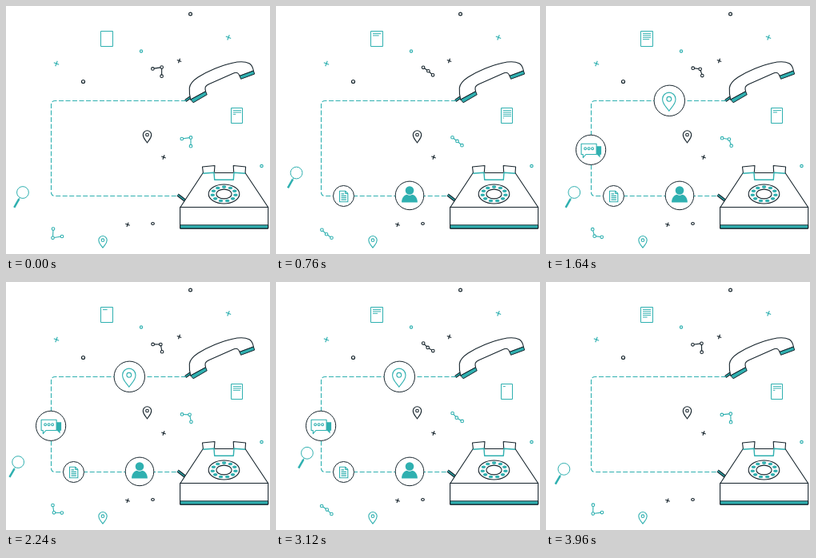
Animation of 330 by 310 pixels, one loop 4000 ms. Source, as an HTML page with a canvas:

```html
<!DOCTYPE html>
<html lang="en">
<head>
<meta charset="utf-8">
<title>Phone call flow</title>
<style>
  html, body { margin: 0; width: 100%; height: 100%; overflow: hidden; background: #fff; }
  canvas { display: block; width: 330px; height: 310px; }
</style>
</head>
<body>
<canvas id="stage"></canvas>
<script>
const W = 330, H = 310, LOOP = 4000, HALF = 2000;
const TEAL = '#2fb0b0', DARK = '#16242c', WHITE = '#fff';
const canvas = document.getElementById('stage');
const ctx = canvas.getContext('2d');
const ratio = window.devicePixelRatio || 1;
canvas.width = W * ratio;
canvas.height = H * ratio;

const clamp = v => Math.max(0, Math.min(1, v));
const mix = (a, b, k) => a + (b - a) * k;
const easeOut = k => 1 - (1 - k) ** 3;

function paint(path, stroke, fill, width = 1) {
  if (fill) { ctx.fillStyle = fill; ctx.fill(path); }
  if (stroke) { ctx.strokeStyle = stroke; ctx.lineWidth = width; ctx.stroke(path); }
}

function shape(d, stroke, fill, width) {
  paint(new Path2D(d), stroke, fill, width);
}

function oval(x, y, rx, ry, stroke, fill, width) {
  const p = new Path2D();
  p.ellipse(x, y, rx, ry, 0, 0, Math.PI * 2);
  paint(p, stroke, fill, width);
}

const ring = (x, y, r, stroke, fill, width) => oval(x, y, r, r, stroke, fill, width);

function cross(x, y, r, color) {
  const s = r * .38;
  shape(`M${x - r} ${y - s}L${x + r} ${y + s}M${x + s} ${y - r}L${x - s} ${y + r}`, color, null, 1.15);
}

// Map pin: (x, y) is the head centre, r its radius, drop the distance to the tip.
function pin(x, y, r, drop, hole, color, width) {
  shape(`M${x} ${y + drop}C${x - r * .35} ${y + drop * .68} ${x - r} ${y + r * .85} ${x - r} ${y}` +
    `A${r} ${r} 0 0 1 ${x + r} ${y}` +
    `C${x + r} ${y + r * .85} ${x + r * .35} ${y + drop * .68} ${x} ${y + drop}Z`, color, WHITE, width);
  ring(x, y, hole, color, null, width);
}

function scatter() {
  ring(230.5, 10, 1.9, DARK, null, 1.2);
  ring(96.5, 94.5, 2, DARK, null, 1.2);
  oval(183.5, 272, 1.8, 1.5, DARK, null, 1.2);
  ring(169, 56.5, 1.6, TEAL, null, 1.2);
  ring(319.5, 200, 1.7, TEAL, null, 1.2);
  cross(63, 72, 3.2, TEAL);
  cross(278, 39.3, 3.2, TEAL);
  cross(216.5, 68.5, 2.7, DARK);
  cross(197, 189, 2.7, DARK);
  cross(152, 273.3, 2.7, DARK);
  pin(176.5, 161, 5.2, 10, 1.8, DARK, 1.1);
  pin(121, 292.7, 5.2, 9.5, 1.8, TEAL, 1.1);
}

function wire() {
  ctx.setLineDash([6, 2.5]);
  shape('M225 118.5H61.5Q56.5 118.5 56.5 123.5V232.5Q56.5 237.5 61.5 237.5H216', TEAL, null, 1.1);
  ctx.setLineDash([]);
}

function plug(x1, y1, x2, y2) {
  const d = `M${x1} ${y1}L${x2} ${y2}`;
  shape(d, DARK, null, 3.6);
  shape(d, TEAL, null, 1.4);
}

function handset() {
  plug(224.2, 118.4, 231, 113.8);
  shape('M230.8 117C229.5 112 229 107 229.3 102.5C229.8 97 234 93 240 89C252 81.5 270 74 283 71.2' +
    'C290 69.6 299 69.2 304 71.8C308 73.8 308.5 77 309.4 81L292 87.4C291 84.5 289 82 284.5 84' +
    'L254 97.5C248 100 248.6 103 249.6 106.8Z', DARK, WHITE, 1.1);
  shape('M230.8 117L249.6 106.8L251.2 110.8L234.1 120.8Z', DARK, TEAL);
  shape('M292 87.4L309.4 81L310.7 85L293.6 91.3Z', DARK, TEAL);
}

function base() {
  plug(214.6, 236, 224, 243.2);
  shape('M218 251.5L246.3 208.5H299L327.6 251.5Z', DARK, WHITE, 1.1);
  shape('M246.5 209L245.5 201L261 199.5L260.3 209Z', null, WHITE);
  shape('M284.7 209L284.2 199.5L299.6 201L299 209Z', null, WHITE);
  shape('M246.5 209L245.5 201L261 199.5L260.3 208M284.7 208L284.2 199.5L299.6 201L299 209', DARK, null, 1.1);
  shape('M246.3 209.2L260 208.3L260.7 217.3H284.3L285 208.3L299 209.2', TEAL, WHITE, 1.4);
  shape('M217.6 251.5H327.7V277.2Q327.7 278.2 326.7 278.2H218.6Q217.6 278.2 217.6 277.2Z', null, WHITE);
  shape('M217.6 273.8H327.7V278H217.6Z', DARK, TEAL, .9);
  shape('M217.6 251.5H327.7V277.2Q327.7 278.2 326.7 278.2H218.6Q217.6 278.2 217.6 277.2Z', DARK, null, 1.1);

  oval(272.5, 235, 19.3, 12, DARK, WHITE, 1.1);
  for (let i = 0; i < 11; i++) {
    const a = -Math.PI / 2 + i * Math.PI * 2 / 11;
    oval(272.6 + Math.cos(a) * 14.5, 235 + Math.sin(a) * 8.9, 2.8, 1.8, null, TEAL);
  }
  oval(272.5, 235, 9.6, 5.9, DARK, WHITE, 1.1);
}

// A pen writes line after line at constant speed and runs out in the fifth.
function page(x, y, w, h, t) {
  shape(`M${x} ${y}h${w}v${h}h${-w}Z`, TEAL, WHITE);
  for (let i = 0; i < 5; i++) {
    const k = clamp(t / 430 - i);
    if (k > 0) shape(`M${x + 2.5} ${y + 3.1 + i * 2.35}h${10 * k}`, TEAL, null, .95);
  }
}

// Three linked nodes swing between two poses.
function nodes(from, to, k, color) {
  const pts = from.map((p, i) => [mix(p[0], to[i][0], k), mix(p[1], to[i][1], k)]);
  shape('M' + pts.map(p => p.join(' ')).join('L'), color, null, 1.1);
  pts.forEach(p => ring(p[0], p[1], 1.8, color, WHITE, 1.1));
}

function trios(t) {
  const k = 1 - Math.abs(1 - t % HALF / 1000);
  nodes([[183.4, 78.4], [194.7, 76.6], [194.6, 87.7]], [[184.3, 76.3], [189, 82.7], [196.5, 85.9]], k, DARK);
  nodes([[219.8, 166], [231, 164.4], [231, 175.2]], [[220.7, 163.7], [225.1, 170.4], [232.9, 173.8]], k, TEAL);
  nodes([[59, 278.6], [58.5, 289.8], [70, 288]], [[56.9, 280.2], [64.5, 283.8], [69.3, 290.3]], k, TEAL);
}

function lens(t) {
  const a = 2.13 + t / HALF * Math.PI * 2;
  const x = 28.1 + 13.4 * Math.cos(a), y = 221.7 + 13.4 * Math.sin(a);
  ring(x, y, 7.4, TEAL, null, 1);
  shape(`M${x - 3.7} ${y + 6.5}L${x - 4.6} ${y + 8.2}`, TEAL);
  shape(`M${x - 4.6} ${y + 8.2}L${x - 10.7} ${y + 18.8}`, TEAL, null, 2.5);
}

function person() {
  ring(0, -6.4, 5.3, null, TEAL);
  shape('M-9.9 8.7C-9.9 2.2-6.2 -.8-3.2 -1.2Q0 1 3.2 -1.2C6.2 -.8 9.9 2.2 9.9 8.7Z', null, TEAL);
}

function sheet() {
  shape('M-5 -6.3H2L5.3 -3V7.3H-5Z', TEAL, WHITE, 1.1);
  shape('M2 -6.3V-3H5.3', TEAL);
  shape('M-3 -2.6H.6M-3 -.2H3.4M-3 2.2H3.4M-3 4.6H3.4', TEAL, null, 1.3);
}

function chat() {
  shape('M6.5 -4.5H13V6H11.5V9.8L7.8 6H4Z', null, TEAL);
  shape('M-12 -7.5H7V5.7H-6.2L-9.8 9.8V5.7H-12Z', TEAL, WHITE, 1.1);
  [-7, -2.5, 2].forEach(x => ring(x, -1.6, 1.4, TEAL, null, 1.1));
}

function place() {
  pin(-.5, -2, 8.2, 15, 2.9, TEAL, 1.1);
}

const badges = [
  { x: 167, y: 236.9, r: 17.8, start: 80, icon: person },
  { x: 84.5, y: 237.5, r: 13, start: 440, icon: sheet },
  { x: 56.1, y: 179.8, r: 18.6, start: 800, icon: chat },
  { x: 154.3, y: 118.3, r: 19.2, start: 1200, icon: place }
];

function badge(b, t) {
  const size = easeOut(clamp((t - b.start) / 260)) * (1 - clamp((t - 3580) / 260) ** 3);
  if (size <= 0) return;
  ctx.save();
  ctx.translate(b.x, b.y);
  ctx.scale(size, size);
  ring(0, 0, b.r, DARK, WHITE, 1);
  b.icon();
  ctx.restore();
}

function draw(t) {
  ctx.setTransform(ratio, 0, 0, ratio, 0, 0);
  ctx.fillStyle = WHITE;
  ctx.fillRect(0, 0, W, H);
  ctx.lineJoin = 'round';
  scatter();
  page(118.5, 31.5, 15, 19, t % HALF);
  page(281.5, 127.5, 14, 19, (t + 1000) % HALF);
  trios(t);
  wire();
  handset();
  base();
  badges.forEach(b => badge(b, t));
  lens(t);
}

const begin = performance.now();
function tick() {
  draw((performance.now() - begin) % LOOP);
  requestAnimationFrame(tick);
}
tick();
</script>
</body>
</html>
```
